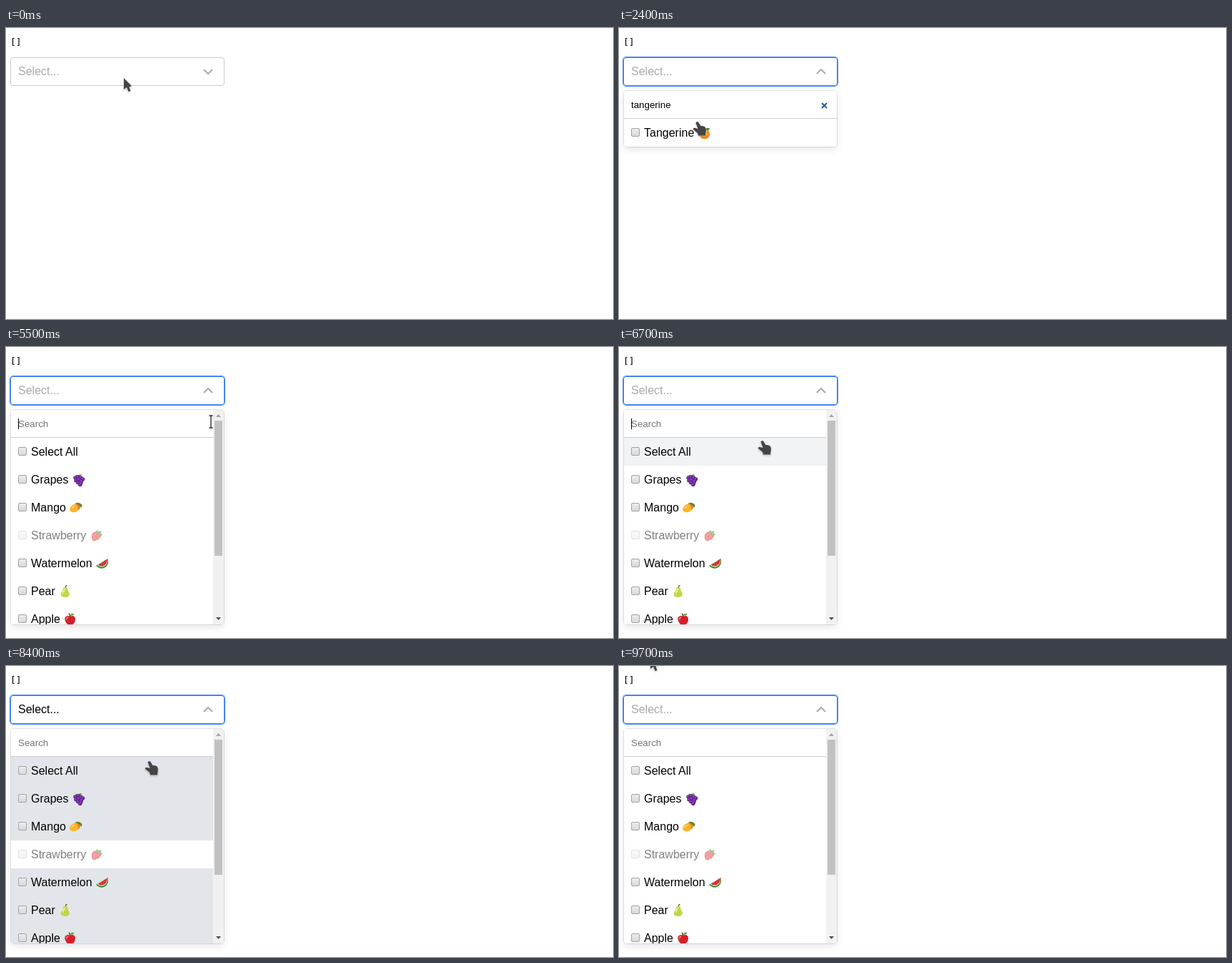
Write an HTML page that moves like this. It is 850 px wide and 407 px high and loops after 9.9 s.

```html
<!DOCTYPE html>
<html lang="en">
<head>
<meta charset="utf-8">
<title>Multi select</title>
<style>
html, body { margin: 0; width: 100%; height: 100%; overflow: hidden; background: #fff; }
#stage { position: relative; width: 850px; height: 407px; overflow: hidden; font: 16px "Liberation Sans", Arial, sans-serif; color: #000; }
#stage div, #cursor, .x, .chev { position: absolute; box-sizing: border-box; white-space: pre; }
#stage .out { left: 6px; font: 13px/15px "DejaVu Sans Mono", monospace; }
.head { left: 6px; top: 41px; width: 300px; height: 40px; border: 1px solid #ccc; border-radius: 4px; }
.head.open { border-color: #4285f4; box-shadow: 0 0 0 1px #4285f4; }
.value { left: 17px; width: 250px; line-height: 39px; overflow: hidden; text-overflow: ellipsis; }
.chev { left: 271px; top: 49px; }
.panel { left: 7px; top: 88px; width: 298px; overflow: hidden; border-radius: 4px; background: #fff; }
.shade { left: 7px; top: 88px; width: 298px; border-radius: 4px; box-shadow: 0 0 0 1px rgba(0,0,0,.1), 0 4px 11px rgba(0,0,0,.1); }
.search { left: 0; top: 0; width: 100%; height: 39px; padding-left: 10px; border-bottom: 1px solid #ccc; font-size: 13.333px; line-height: 39px; }
.caret { top: 12px; width: 1px; height: 15px; background: #000; }
.x { left: 276px; top: 16px; }
.row { left: 0; width: 100%; height: 39px; padding-left: 28px; line-height: 39px; }
.box { left: 10px; top: 13px; width: 12px; height: 12px; border: 1px solid #a2a2a2; border-radius: 2px; background: linear-gradient(#ececec, #d9d9d9); }
.box svg { position: absolute; left: 0; top: 0; }
.off > * { opacity: .5; }
.off .box { opacity: .3; }
.bar { right: 0; top: 0; width: 15px; height: 300px; background: #f1f1f1; }
.thumb { left: 2px; top: 15px; width: 11px; height: 189px; background: #c1c1c1; }
.bar svg { position: absolute; left: 0; top: 0; }
.em { width: 1.1em; height: 1.1em; margin: 0 .07em; vertical-align: -.25em; }
#cursor { left: 0; top: 0; overflow: visible; }
</style>
</head>
<body>
<div id="stage"></div>
<script>
const LOOP = 9900, STEP = 100;
const stage = document.getElementById('stage');

const dots = (color, r, list) => list.map(([x, y]) => `<circle cx="${x}" cy="${y}" r="${r}" fill="${color}"/>`).join('');
const shape = (d, fill, extra = '') => `<path d="${d}" fill="${fill}" ${extra}/>`;
const bunch = [[4, 6], [8, 5], [12, 6], [15, 8], [5, 10], [9, 9], [13, 11], [8, 13], [12, 14], [11, 16]];

// Fruit pictures on an 18 by 18 grid
const art = {
  Grapes: shape('M5 4Q3 1 8 2L13 1Q13 4 9 5Z', '#5b8f2c') + dots('#5e2390', 2.7, bunch) +
    dots('#8e3fb5', 1.4, bunch.map(([x, y]) => [x - .5, y - .6])),
  Mango: shape('M0 12Q0 7 6 4Q14 0 16 6Q16 12 9 15Q2 17 0 12Z', '#fbb52b') +
    shape('M9 4Q15 2 16 7Q15 11 12 12Q13 7 9 4Z', '#ef8123') +
    shape('M8 3Q13 0 18 5L17 9Q14 4 8 3Z', '#4f8a2c') +
    shape('M2 11Q3 7 7 6Q5 10 2 11Z', '#ffdc69'),
  Strawberry: shape('M2 8Q4 3 10 3Q17 4 16 9Q14 15 6 17Q1 17 2 8Z', '#e8333c') +
    shape('M7 4L10 1L12 3L16 2L15 5L18 8L14 8L12 6L9 6Z', '#4c9a2f') +
    dots('#ffc56b', .6, [[5, 9], [8, 8], [5, 13], [8, 12], [11, 10], [13, 12], [9, 15]]),
  Watermelon: shape('M17 2Q19 9 14 14Q7 19 0 12Z', '#3c8a32') +
    shape('M17 2Q17.5 8 13 12.5Q8 16 1.5 11.5Z', '#d9efae') +
    shape('M17 2Q16.5 8 12.5 11.5Q8 14.5 3 11Z', '#ee3b48') +
    dots('#40201d', .7, [[13, 6], [10, 8], [13, 9], [9, 11], [6, 11]]),
  Pear: shape('M10 4Q9 1 12 0', 'none', 'stroke="#7b4b2a" stroke-width="1.3"') +
    shape('M6 5Q7 2 10 3Q13 4 13 8Q17 13 14 16Q9 19 4 16Q1 13 5 9Z', '#c3d64a') +
    shape('M7 5Q9 4 9 7Q8 10 5 13Q5 10 7 5Z', '#eaf29a'),
  Apple: shape('M9 5Q5 3 2 6Q0 10 4 15Q7 18 9 16.500Q12 18 15 14Q18 9 15 5Q12 3 9 5Z', '#d4202b') +
    shape('M3 8Q4 5 7 6Q5 8 4 11Z', '#ff7470') +
    shape('M9 6Q9 2 7 1', 'none', 'stroke="#6b3d20" stroke-width="1.400"') +
    shape('M9 4Q10 0 15 1Q14 4 9 4Z', '#5fa535'),
  Tangerine: `<circle cx="9" cy="10.300" r="7.500" fill="#f68a10"/>` +
    `<ellipse cx="8" cy="9" rx="5.500" ry="5" fill="#ffa726"/>` + dots('#ffc970', 1, [[5, 8], [7, 12], [11, 11]]) +
    shape('M9 4Q5 0 1 3Q5 6 9 4Q13 7 17 3Q12 0 9 4Z', '#4a8b2d') +
    shape('M9 5V1', 'none', 'stroke="#466b24" stroke-width="1.300"')
};
const fruits = Object.keys(art);
const enabled = fruits.filter(f => f !== 'Strawberry');
const label = f => `${f} <svg class="em" viewBox="0 0 18 18">${art[f]}</svg>`;

const pointers = {
  arrow: shape('M0 0V16L4 13L6.500 19L9.500 18L7.500 12.500L11 11Z', '#454545'),
  hand: shape('M-2.500 1.500Q-1 -1 1 .5L4.500 6Q9 5.500 11 8Q12.500 11 11.500 15L11 19.500H1L0 16L-6 11Q-6.500 8 -3 9L.5 10Z', '#454545'),
  beam: shape('M-2.500 -8.500H2.500M0 -8.500V8.500M-2.500 8.500H2.500', 'none', 'stroke="#333" stroke-width="1.300"')
};

// Pointer path: time, x, y
const path = [
  [0, 165, 70], [100, 165, 70], [600, 134, 58], [1000, 134, 58], [1500, 138, 96], [2000, 138, 96],
  [2400, 110, 131], [2600, 97, 144], [4300, 97, 144], [5000, 287, 95], [5400, 287, 95], [5500, 287, 104.5],
  [5700, 287, 104.5], [6100, 375, 119], [6200, 375, 119], [6700, 201, 131], [7200, 201, 131], [7400, 201, 133],
  [8700, 201, 133], [9100, 345, 29], [9200, 345, 29], [9700, 44, -12], [LOOP, 44, -12]
];

function pointerAt(t) {
  const i = Math.max(1, path.findIndex(p => p[0] >= t));
  const [t0, x0, y0] = path[i - 1], [t1, x1, y1] = path[i];
  const k = Math.max(0, (t - t0) / (t1 - t0));
  return { x: x0 + (x1 - x0) * k, y: y0 + (y1 - y0) * k };
}

const during = (t, from, to) => t >= from && t < to;
const inPanel = p => p.x > 7 && p.x < 290;
const inRow = p => inPanel(p) && p.y >= 127 && p.y < 166;
const inSearch = p => inPanel(p) && p.y >= 88 && p.y < 127;

function caretOn(t) {
  const start = [900, 1800, 5500].filter(s => s <= t).pop();
  const focused = during(t, 900, 2800) || during(t, 5500, 6800);
  return focused && (t - start) % 1000 < 500;
}

function row(html, i, { checked, bg, off }) {
  const tick = checked ? '<svg width="10" height="10"><path d="M1.500 5L4 7.500L8.500 1.500" fill="none" stroke="#333" stroke-width="2"/></svg>' : '';
  return `<div class="row${off ? ' off' : ''}" style="top:${39 * (i + 1)}px;background:${bg}"><div class="box">${tick}</div><span>${html}</span></div>`;
}

function panel(t, p) {
  const typed = during(t, 1800, 5500);
  const height = typed ? 78 : 300;
  const all = during(t, 6800, 8400), one = during(t, 2800, 4300);
  const lit = during(t, 6800, 8500) || during(t, 2800, 4400);
  const hover = inRow(p) && inRow(pointerAt(t - STEP));
  const names = typed ? ['Tangerine'] : ['Select All', ...fruits];
  const rows = names.map((name, i) => {
    const off = name === 'Strawberry';
    const bg = lit && !off ? '#e2e6ea' : hover && i === 0 ? '#f1f3f5' : '#fff';
    return row(art[name] ? label(name) : name, i, { checked: (all || one) && !off, bg, off });
  }).join('');
  const clear = typed && (t < 2800 || inSearch(p))
    ? '<svg class="x" width="10" height="10"><path d="M1 1L8 8M8 1L1 8" stroke="#2a5a9e" stroke-width="2"/></svg>' : '';
  const caret = caretOn(t) ? `<div class="caret" style="left:${typed ? 66 : 10}px"></div>` : '';
  const bar = typed ? '' : '<div class="bar"><div class="thumb"></div><svg width="15" height="300"><path d="M4 10L7.500 6L11 10Z" fill="#a3a3a3"/><path d="M4 290L7.500 294L11 290Z" fill="#505050"/></svg></div>';
  return `<div class="shade" style="height:${height}px"></div><div class="panel" style="height:${height}px">` +
    `<div class="search" style="color:${typed ? '#000' : '#757575'}">${typed ? 'tangerine' : 'Search'}${caret}${clear}</div>${rows}${bar}</div>`;
}

function pointer(t, p) {
  const overClear = p.x > 281 && t < 5500;
  const kind = t < 900 ? 'arrow' : inRow(p) ? 'hand' : inSearch(p) && !overClear ? 'beam' : 'arrow';
  return `<svg id="cursor" width="1" height="1"><g transform="translate(${p.x} ${p.y})" style="paint-order:stroke;filter:drop-shadow(0 0 1px #fff) drop-shadow(0 1px 1px #0004)">${pointers[kind]}</g></svg>`;
}

function render(t) {
  const p = pointerAt(t), open = t >= 900;
  const chosen = during(t, 2800, 4300) ? ['Tangerine'] : during(t, 6800, 8400) ? enabled : [];
  const settling = during(t, 4300, 4400) || during(t, 8400, 8500);
  const json = chosen.map(f => `{"label":"${label(f)}","value":"${f.toLowerCase()}"}`).join(',');
  const some = chosen.length > 0;
  stage.innerHTML =
    `<div class="out" style="top:${some ? 11 : 12}px">[${json}]</div>` +
    `<div class="head${open ? ' open' : ''}"></div>` +
    `<div class="value" style="top:${some ? 42 : 41}px;color:${some || settling ? '#000' : '#aaa'}">${some ? chosen.map(label).join(', ') : 'Select...'}</div>` +
    `<svg class="chev" width="24" height="24"><path d="${open ? 'M6 15L12 9L18 15' : 'M6 9L12 15L18 9'}" fill="none" stroke="#aaa" stroke-width="2"/></svg>` +
    (open ? panel(t, p) : '') + pointer(t, p);
}

let shown = -1;
function tick() {
  const t = Math.floor(performance.now() % LOOP / STEP) * STEP;
  if (t !== shown) render(shown = t);
  requestAnimationFrame(tick);
}
tick();
</script>
</body>
</html>
```
